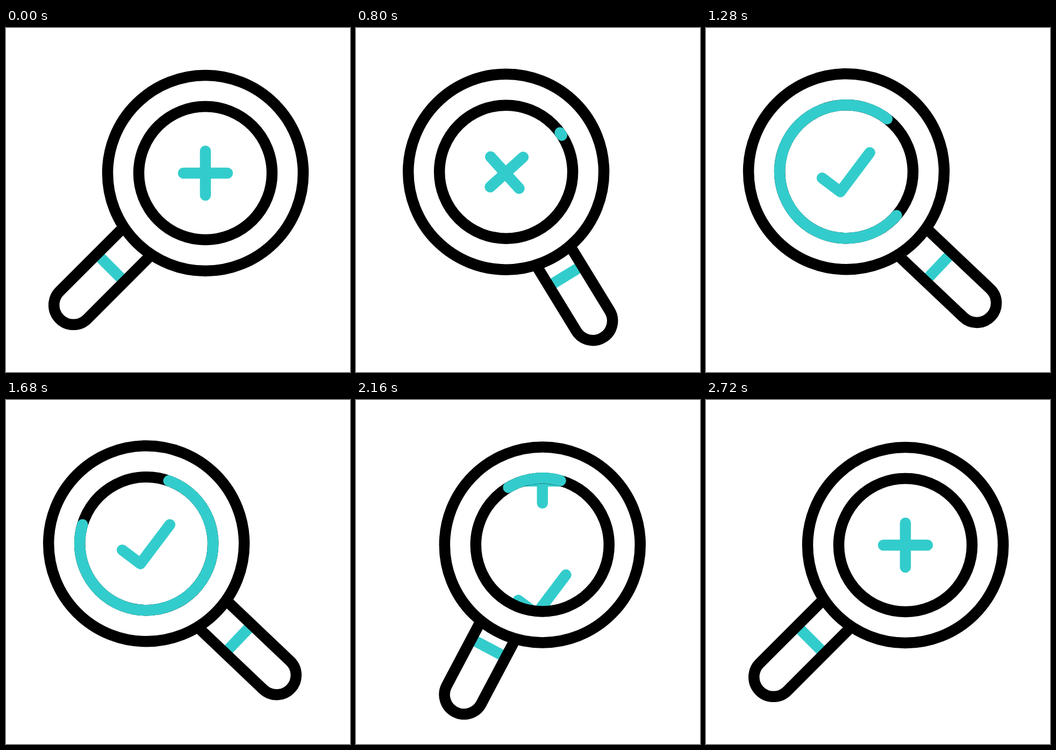
An HTML page that plays this animation: 640 by 640 pixels, repeating every 3000 ms.

```html
<!DOCTYPE html>
<html lang="en">
<head>
<meta charset="utf-8">
<title>Magnifier</title>
<style>
  html, body { margin: 0; width: 100%; height: 100%; overflow: hidden; background: #fff; }
  svg { display: block; width: 100vw; height: 100vh; }
  .ink, .teal { fill: none; stroke-width: 20.5; }
  .ink { stroke: #000; }
  .teal { stroke: #33cccc; }
  .round { stroke-linecap: round; stroke-linejoin: round; }
</style>
</head>
<body>
<svg viewBox="0 0 640 640">
  <defs>
    <clipPath id="glass"><circle r="118"/></clipPath>
  </defs>
  <g id="handle">
    <path class="teal" d="M-36 97H36"/>
    <path class="ink" d="M-36.3 -20V195A36.3 36.3 0 0 0 36.3 195V-20"/>
  </g>
  <g id="lens">
    <circle r="182" class="ink" style="fill:#fff"/>
    <g clip-path="url(#glass)">
      <path id="mark" class="teal round"/>
      <path id="plus" class="teal round" d="M0 -41V41M-41 0H41"/>
    </g>
    <circle r="124" class="ink"/>
    <path id="arc" class="teal round"/>
  </g>
</svg>
<script>
const LOOP = 3000, STEP = 40, R = 124;
const el = id => document.getElementById(id);
const handle = el('handle'), lens = el('lens'), mark = el('mark'), plus = el('plus'), arc = el('arc');

const clamp = x => Math.min(1, Math.max(0, x));
const mix = (a, b, k) => a + (b - a) * k;
const span = (t, from, to) => clamp((t - from) / (to - from));
const smooth = u => u * u * (3 - 2 * u);

// cubic-bezier(a, 0, b, 1)
function ease(u, a, b) {
  if (u <= 0 || u >= 1) return clamp(u);
  let lo = 0, hi = 1;
  for (let i = 0; i < 30; i++) {
    const s = (lo + hi) / 2, r = 1 - s;
    if (3 * s * r * r * a + 3 * s * s * r * b + s * s * s < u) lo = s; else hi = s;
  }
  return smooth(lo);
}

// 0 = right-hand pose, 1 = left-hand pose
function swing(t, out, back) {
  return t < 1640 ? ease(span(t, 240, 1320), ...out)
                  : 1 - ease(span(t, 1640, 2720), ...back);
}

function drawHandle(t) {
  const slide = swing(t, [.55, .19], [.55, .18]);
  const turn = swing(t, [.57, .06], [.54, .03]);
  const bob = (t < 1640 ? 1.6 : -3) * 4 * turn * (1 - turn);
  const x = mix(263.4, 362.3, slide), y = 377.6 + bob;
  handle.setAttribute('transform', `translate(${x} ${y}) rotate(${mix(45, -46.6, turn)})`);
}

function drawLens(t) {
  const k = swing(t, [.57, .06], [.56, .08]);
  lens.setAttribute('transform', `translate(${mix(371, 261, k)} ${mix(270, 267.2, k)})`);
}

// The plus turns and morphs into a check, then a new plus drops in
function drawMark(t) {
  const turn = -53 * ease(span(t, 436, 1190), .56, .06);
  const m = ease(span(t, 680, 1280), .56, .06);
  const drop = 210 * ease(span(t, 1760, 2720), .56, .28);
  const x = mix(0, -36.6, m), y = mix(0, 13.6, m);
  mark.setAttribute('d',
    `M${x} ${mix(-41, -28.7, m)}V${mix(41, 13.6, m)}M${mix(-41, -36.6, m)} ${y}H${mix(41, 54.4, m)}`);
  mark.setAttribute('transform', `translate(0 ${drop}) rotate(${turn})`);
  plus.setAttribute('transform', `translate(0 ${drop - 210})`);
}

function drawArc(t) {
  const shown = t > 760 && t < 2450;
  arc.style.display = shown ? '' : 'none';
  if (!shown) return;
  const origin = mix(54, 384, ease(span(t, 800, 2400), .417, .416));
  const growing = t < 1540;
  const part = growing ? smooth(span(t, 760, 1540)) : (1 - span(t, 1540, 2450)) ** 1.79;
  const size = Math.min(359.9, 360 * part);
  const from = growing ? origin : origin - size;
  const at = deg => {
    const a = deg * Math.PI / 180;
    return `${R * Math.sin(a)} ${-R * Math.cos(a)}`;
  };
  arc.setAttribute('d', `M${at(from)}A${R} ${R} 0 ${size > 180 ? 1 : 0} 1 ${at(from + size)}`);
}

function draw(now) {
  const t = Math.floor((now % LOOP) / STEP) * STEP;
  drawHandle(t);
  drawLens(t);
  drawMark(t);
  drawArc(t);
}

let start;
function tick(now) {
  start ??= now;
  draw(now - start);
  requestAnimationFrame(tick);
}
draw(0);
requestAnimationFrame(tick);
</script>
</body>
</html>
```
